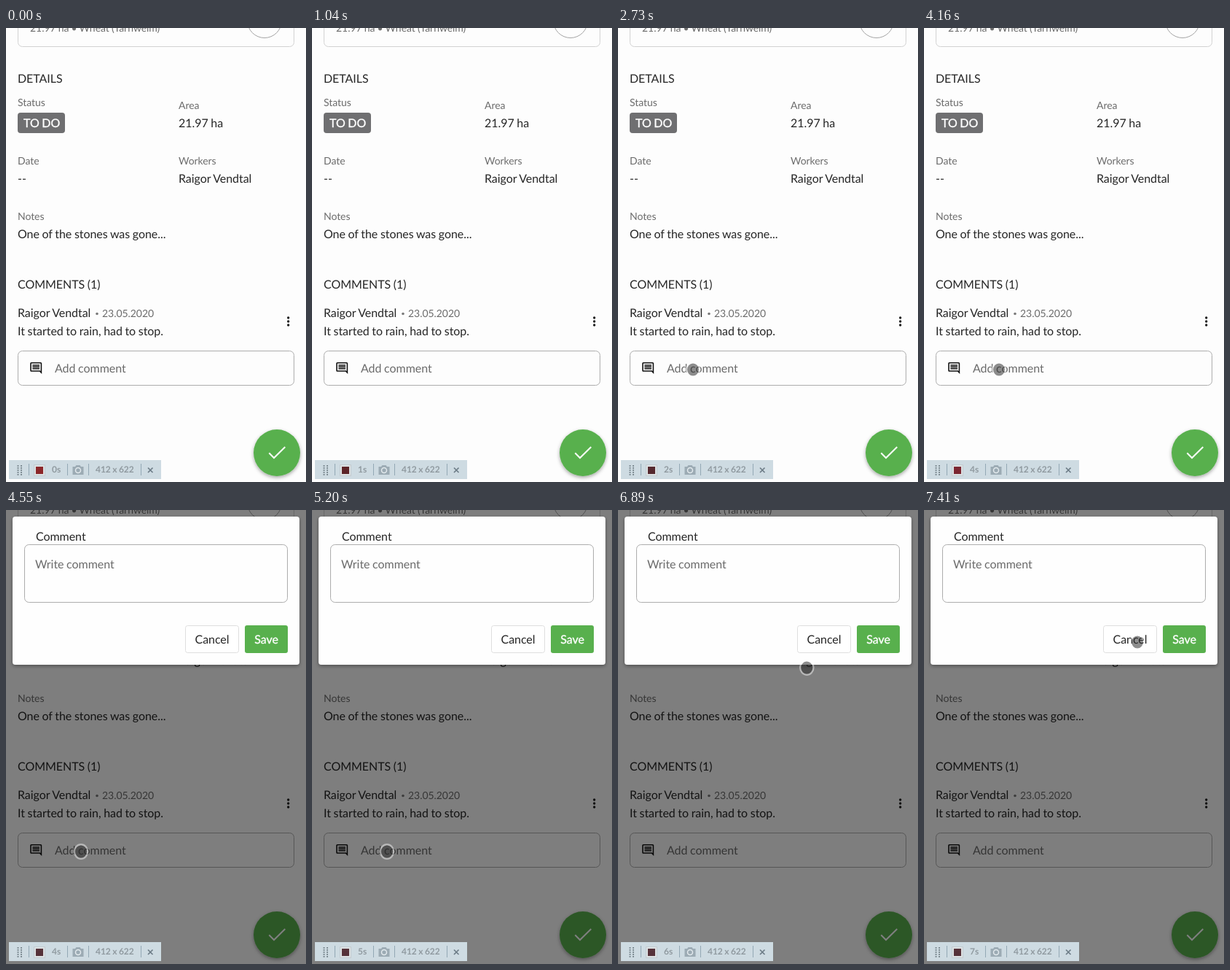
An HTML page for the animation above (8000 ms loop, 412 px wide and 622 px high).

```html
<!DOCTYPE html>
<html lang="en">
<head>
<meta charset="utf-8">
<title>Add comment</title>
<style>
  html, body { margin: 0; width: 100%; height: 100%; overflow: hidden; background: #fdfdfd; }
  svg { display: block; width: 412px; height: 622px; }
  text {
    font: 16px Lato, sans-serif; fill: #262626; white-space: pre;
    letter-spacing: -.05px; word-spacing: -.4px; text-rendering: geometricPrecision;
  }
  .label { font-size: 14px; fill: #6c6c6c; }
  .hint { fill: #6b6b6b; }
  .white { fill: #fff; stroke: #fff; stroke-width: .35px; }
  .mid { text-anchor: middle; }
  .tool { font-size: 12px; font-weight: 700; fill: #909aa0; }
  .field { fill: none; stroke: #adadad; }
</style>
</head>
<body>
<svg viewBox="0 0 412 622">
  <defs>
    <filter id="soft" x="-30%" y="-30%" width="160%" height="160%">
      <feDropShadow dx="0" dy="2" stdDeviation="2.5" flood-color="#000" flood-opacity=".35"/>
    </filter>
  </defs>
  <rect width="412" height="622" fill="#fdfdfd"/>

  <g id="page">
    <rect x="16.5" y="-40" width="379" height="65.5" rx="6" fill="none" stroke="#d2d2d2"/>
    <circle cx="355" cy="-10" r="23.5" fill="none" stroke="#a5a5a5"/>
    <rect x="16" y="116" width="65" height="28" rx="4" fill="#6f6f71"/>
    <rect class="field" x="16.5" y="442.5" width="379" height="47" rx="6"/>
    <path transform="translate(31.6 456.4) scale(.8)" fill="#111" d="M22 4c0-1.1-.9-2-2-2H4c-1.1 0-2 .9-2 2v12c0 1.1.9 2 2 2h14l4 4zM20 4v13.2L18.8 16H4V4zM6 12h12v2H6zM6 9h12v2H6zM6 6h12v2H6z"/>
    <circle cx="125" cy="391.5" r="1.8" fill="#7a7a7a"/>
    <g fill="#1c1c1c">
      <circle cx="387.7" cy="397" r="1.7"/><circle cx="387.7" cy="402" r="1.7"/><circle cx="387.7" cy="407" r="1.7"/>
    </g>
    <circle cx="372" cy="582" r="32" fill="#58b04d" filter="url(#soft)"/>
    <path d="M361.3 582.3l6.700 6.700L383.300 574" fill="none" stroke="#fff" stroke-width="2"/>
  </g>

  <g id="modal">
    <rect width="412" height="622" opacity=".5"/>
    <rect x="9" y="9" width="394" height="203" rx="4" fill="#fefefe" filter="url(#soft)"/>
    <rect class="field" x="25.5" y="47.5" width="361" height="79" rx="6"/>
    <rect x="246.5" y="158.5" width="73" height="37" rx="3" fill="#fff" stroke="#dedede"/>
    <rect x="328" y="158" width="59" height="38" rx="3" fill="#58b04d"/>
  </g>

  <g id="cursor">
    <ellipse rx="9.2" ry="9.8" fill="none" stroke="#fff" stroke-opacity=".45" stroke-width="2.2"/>
    <ellipse rx="8" ry="8.6" fill="#282828" fill-opacity=".53"/>
  </g>

  <g id="bar">
    <rect x="4" y="592" width="209" height="26" fill="#cedbe2"/>
    <path d="M31.5 597v16M84.5 597v16M113.5 597v16M185.5 597v16" stroke="#93a8b5"/>
    <path d="M16.5 599v14M21 599v14" stroke="#76848b" stroke-width="2" stroke-dasharray="1.8 1.2"/>
    <rect x="38.5" y="598.5" width="15" height="15" fill="#dce1e3" stroke="#c3ccd1"/>
    <rect id="rec" x="41" y="601" width="10" height="10"/>
    <path d="M91.5 601h3.5l1.5-2h5l1.5 2h3.5v11h-15z" fill="#9cabb4"/>
    <circle cx="99" cy="606" r="3.5" fill="#9cabb4" stroke="#e3eaee" stroke-width="1.5"/>
    <path d="M195 602.500l6.500 6.500m0-6.500l-6.500 6.500" stroke="#6d7c87" stroke-width="1.700"/>
  </g>
</svg>
<script>
const $ = id => document.getElementById(id);
const LOOP = 8000, STEP = 130, OPEN_AT = 4550;
const worker = 'Raigor Vendtal';

function put(parent, x, y, str, cls = '') {
  const el = document.createElementNS('http://www.w3.org/2000/svg', 'text');
  el.setAttribute('x', x);
  el.setAttribute('y', y);
  el.setAttribute('class', cls);
  el.textContent = str;
  $(parent).append(el);
  return el;
}

[
  [33, 4.5, '21.97 ha • Wheat (Tarnwelm)', 'label'],
  [16, 75, 'DETAILS'],
  [16, 107, 'Status', 'label'], [24, 136, 'TO DO', 'white'],
  [237, 111, 'Area', 'label'], [237, 136, '21.97 ha'],
  [16, 187, 'Date', 'label'], [16, 212, '--'],
  [237, 187, 'Workers', 'label'], [237, 212, worker],
  [16, 263, 'Notes', 'label'], [16, 288, 'One of the stones was gone...'],
  [16, 357, 'COMMENTS (1)'],
  [16, 396, worker], [132, 396, '23.05.2020', 'label'],
  [16, 421, 'It started to rain, had to stop.'],
  [67, 472, 'Add comment', 'hint']
].forEach(a => put('page', ...a));

put('modal', 41, 42, 'Comment');
put('modal', 40, 80, 'Write comment', 'hint');
put('modal', 283, 183, 'Cancel', 'mid');
put('modal', 357.5, 183, 'Save', 'white mid');

const clock = put('bar', 63, 609, '0s', 'tool');
put('bar', 123, 609, '412 x 622', 'tool');

// [time, x, y]
const path = [
  [1820, 52, 603], [1950, 58, 574], [2080, 68, 535], [2340, 80, 519], [2730, 103, 468],
  [5980, 103, 468], [6370, 144, 352], [6630, 206, 272], [7020, 286, 188], [7150, 293, 181]
];
const ticks = [1040, 1950, 2860, 4160, 5200, 6500, 7280];
const lamp = [
  [0, '#8c272a'], [1040, '#5c2428'], [1950, '#55292f'],
  [2860, '#6a2832'], [4160, '#7c2732'], [4550, '#56323a']
];

function pointAt(t) {
  const i = path.findIndex(p => p[0] > t);
  if (i < 0) return path[path.length - 1].slice(1);
  const a = path[Math.max(i - 1, 0)], b = path[i];
  const k = b === a ? 0 : (t - a[0]) / (b[0] - a[0]);
  return [a[1] + (b[1] - a[1]) * k, a[2] + (b[2] - a[2]) * k];
}

function draw(time) {
  const t = Math.floor(time % LOOP / STEP) * STEP;
  const [x, y] = pointAt(t);
  $('cursor').setAttribute('transform', `translate(${x} ${y})`);
  $('cursor').style.display = t < path[0][0] ? 'none' : '';
  $('modal').style.display = t < OPEN_AT ? 'none' : '';
  clock.textContent = ticks.filter(s => s <= t).length + 's';
  $('rec').setAttribute('fill', lamp.filter(l => l[0] <= t).pop()[1]);
}

const start = performance.now();
function frame() {
  draw(performance.now() - start);
  requestAnimationFrame(frame);
}
frame();
</script>
</body>
</html>
```
